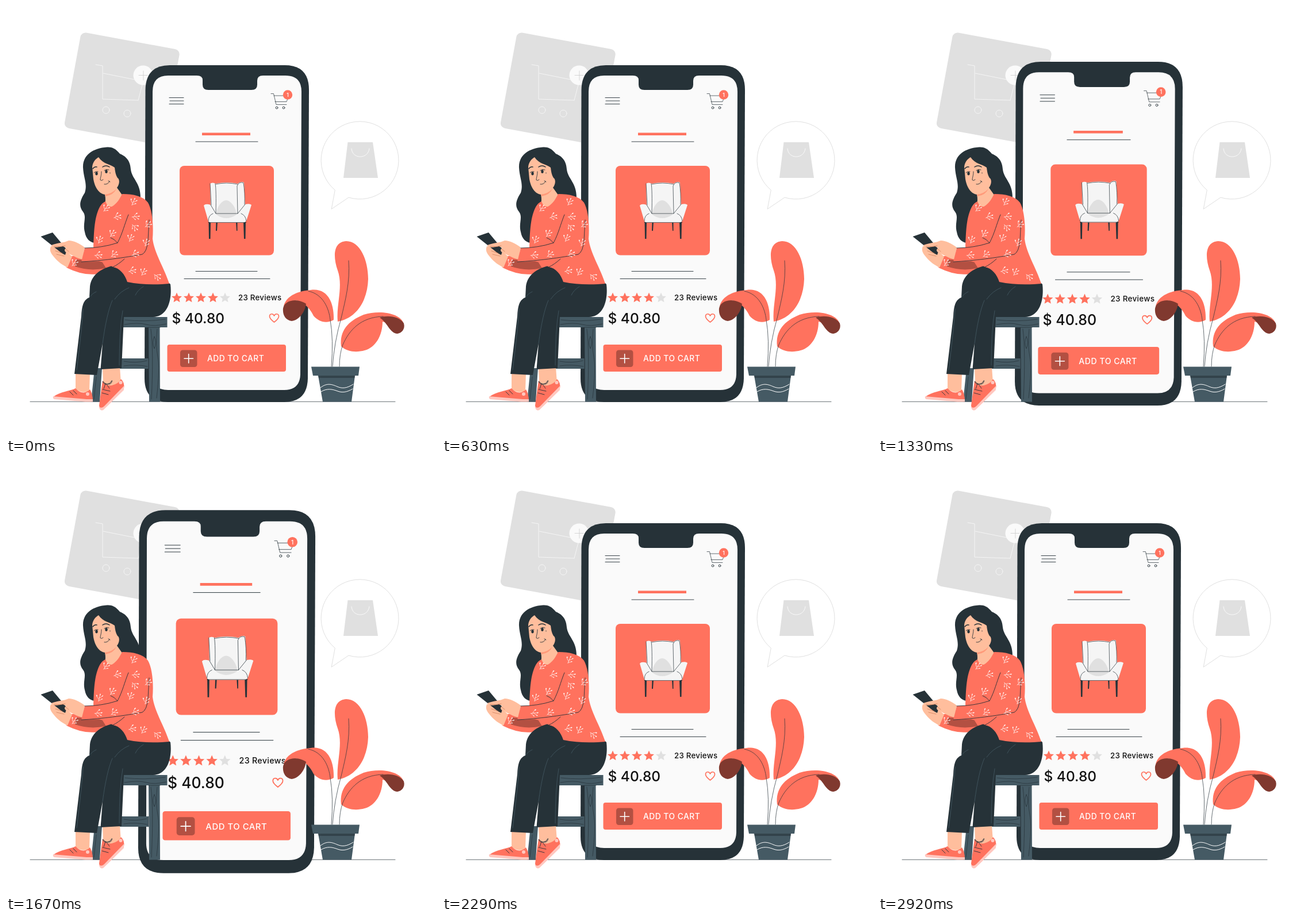
An HTML page that plays this animation: 748 by 748 pixels, repeating every 2960 ms.

```html
<!DOCTYPE html>
<html lang="en">
<head>
<meta charset="utf-8">
<title>Add to cart</title>
<style>
html, body { margin: 0; width: 100%; height: 100%; overflow: hidden; background: #fff; }
svg { display: block; width: 100%; height: 100%; fill: none; stroke-linecap: round; stroke-linejoin: round; }
text { font-family: Inter, "Open Sans", sans-serif; font-weight: 450; }
.dark { fill: #263238; }
.coral { fill: #ff725e; }
.rust { fill: #80392f; }
.shade { fill: #b35042; }
.grey { fill: #e0e0e0; }
.pale { fill: #fafafa; }
.slate { fill: #455a64; }
.skin { fill: #ffbe9d; }
.pink { fill: #ffc7bf; }
.ink { stroke: #263238; stroke-width: .9; }
.thin { stroke: #263238; stroke-width: .7; }
.bold { stroke: #263238; stroke-width: 1.5; }
.white { stroke: #fff; }
</style>
</head>
<body>
<svg viewBox="0 0 748 748">
  <defs>
    <g id="sprig" class="white" stroke-width=".8">
      <path d="M0 8Q0 0 1-7M0 3Q-4 1-6-3M0 0Q4-1 6-5M0 6Q4 5 6 2"/>
      <path fill="#fff" d="M1-7q-2-1 0-3q2 2 0 3M-6-3q-2 0-1-3q3 1 1 3M6-5q0-2 2-2q0 2-2 2M6 2q1-2 2-1q0 1-2 1"/>
    </g>
    <path id="star" d="M0-9 2.6-3 9-2.6 4.2 1.8 5.5 7.8 0 4.6-5.5 7.8-4.2 1.8-9-2.6-2.6-3Z"/>
  </defs>

  <!-- Cart card -->
  <rect class="grey" width="175" height="169" rx="9" transform="translate(131 45) rotate(10.4)"/>
  <g stroke="#f5f5f5">
    <path d="M156 102 168 104 168 162 230 164M169 117 224 128M237 137 230 164"/>
    <circle cx="174" cy="181" r="6"/><circle cx="211" cy="187" r="6"/>
  </g>
  <circle class="pale" cx="238.500" cy="120.500" r="17"/>
  <path stroke="#ccc" stroke-width=".8" d="M231 120.500h15M239 113v16"/>

  <!-- Speech bubble -->
  <path fill="#fff" stroke="#e0e0e0" d="M572 320A67.500 67.500 0 1 1 596 333L566.500 353Z"/>
  <path class="grey" d="M594.500 237H638L647 299H587Z"/>
  <path stroke="#fafafa" d="M601 248C602 267 630 267 632 248"/>

  <path class="thin" d="M42 688.300H677"/>

  <g id="phone">
    <path class="dark" d="M285 103H485Q527 103 527 146L525 648Q524 689 484 689H282Q241 689 241 648L242.500 146Q243 103 285 103Z"/>
    <path class="pale" d="M282 121H332Q342 121 342 129V137Q342 146 352 146H427Q437 146 437 137V130Q437 121 447 121H486Q514 121 514 149L512 641Q511 668 484 668H282Q254 668 254 641L255 149Q255 121 282 121Z"/>
    <path class="ink" d="M284 159.500H309M285 165H309M284 170.500H309"/>
    <path class="thin" d="M461 152.500H465.500L470 171.500H488M466 156H482M468 166.500H488L490 161"/>
    <circle class="ink" cx="471" cy="177" r="1.900"/><circle class="ink" cx="483" cy="177" r="1.900"/>
    <circle class="coral" cx="490" cy="154.500" r="8.200"/>
    <text x="490" y="158" font-size="9.500" text-anchor="middle" fill="#fff">1</text>

    <path class="coral" d="M341 220.500H425V225H341Z"/>
    <path class="ink" d="M330 236H438M330 461.500H437M310 474.500H459"/>
    <rect class="coral" x="302" y="278" width="164" height="155.500" rx="8"/>

    <!-- Armchair -->
    <path class="dark" d="M352.500 375H356L355.500 405H353ZM413 375H417L416.500 405H414ZM365.500 375H368L367 391H365ZM400 375H402.500V391H401Z"/>
    <path fill="#f5f5f5" d="M355 309Q359 306 365 309Q384 305 403 309Q409 304 414 307L416 345Q424 343 427 346L419 371Q418 376 413 377H357Q352 377 351 371L344 347Q347 343 356 346Z"/>
    <path class="grey" d="M366 363C366 349 376 338 383 338S400 349 401 363Q383 375 366 363Z"/>
    <path class="thin" d="M364 309Q366 320 365 361M403 361 402 313Q405 305 413 307.500Q416 325 415 345M355 309 357 346M365 310Q383 306 403 310M356 346 365 361H403L416 345M352 376.500H418M352 374Q352 364 360 361M418 374Q417 364 409 361"/>

    <g id="stars"></g>
    <text x="404" y="512" font-size="13.300" letter-spacing=".25" fill="#111">23 Reviews</text>
    <text x="288.500" y="552" font-size="24.500" fill="#111">$ 40.80</text>
    <path stroke="#ff725e" stroke-width="1.700" d="M466.500 550C460 545 458.500 542 458.500 540C458.500 534.500 465 534.500 466.500 539C468 534.500 474.500 534.500 474.500 540C474.500 542 473 545 466.500 550Z"/>
    <rect class="coral" x="280.500" y="589" width="206.500" height="47" rx="4"/>
    <rect class="shade" x="303" y="598.500" width="29.500" height="29.500" rx="4.500"/>
    <path class="white" stroke-width="1.600" d="M310 613.300H325.500M317.700 605.500V621"/>
    <text x="350" y="618.300" font-size="13.800" letter-spacing=".5" fill="#fff">ADD TO CART</text>
  </g>

  <!-- Stool -->
  <path class="slate" d="M200 541H280.500V559H200ZM248 559H267.500L268 688.500H249ZM195 613H248V631H195ZM154 630H167L163 688.500H148Z"/>
  <path class="thin" d="M207 546Q240 550 277 545M206 554Q230 550 244 554T279 553M252 562Q257 600 253 684M263 562Q260 590 264 610T262 682M258 575Q263 585 258 596Q253 585 258 575M205 618Q225 622 245 617M205 626Q225 623 246 627M248 559H268M248 613V631M157 645 153 684"/>

  <!-- Woman: hair, face -->
  <path class="dark" d="M176 245.500C152 247 133 259 134 281C135 300 142 309 137 325C130 336 125 347 134 358C141 367 133 378 137 393C139 405 146 411 154 412L172 400 192 350 234 333C234 307 219 301 217 284C216 267 207 261 198 257C191 248 184 245 176 245.500Z"/>
  <path class="skin" d="M150 280C151 271 156 266 161 263C169 275 181 275 189 281C190 289 191 294 194 299C198 301 198 310 193 316L203 330 184 354 172 346Q174 337 172 328C160 326 154 313 152 301Z"/>
  <path fill="#ff9a7a" d="M172 328Q185 326 192 318Q187 329 173 331Z"/>
  <ellipse class="dark" cx="157.500" cy="291.500" rx="2.200" ry="2.900"/>
  <ellipse class="dark" cx="174.500" cy="288" rx="2.200" ry="2.900"/>
  <path class="bold" d="M151 283Q154 279 158 280M168 280Q174 276 180 280"/>
  <path class="ink" d="M153 290Q156 287 160 288M171 286Q175 283 179 285M166 288C166 295 164 299 164 302.500Q166 305 169 302M171 310Q177 311 180 305M178 304 181 306M181 290V291"/>

  <!-- Far arm and hands -->
  <path class="coral" d="M114 435 105 455Q135 470 160 466Q175 462 185 452L150 435Z"/>
  <path class="shade" d="M122 441 120 453Q145 462 174 456L166 443Z"/>
  <path class="skin" d="M78 418C75 425 78 430 83 436C91 446 98 450 107 455L115 436Q106 426 94 420Z"/>
  <path class="dark" d="M60.500 401 81 394 106 424 103 433 97 430Z"/>
  <path class="skin" d="M137 420C128 413 118 408 109 408C101 412 88 412 79 416C79 420 86 421 99 418L105 421C99 424 103 429 108 430C116 434 124 439 133 441Z"/>
  <path stroke="#c97955" stroke-width=".7" d="M84 418Q94 420 103 417M86 426 98 430M88 432 101 435M103 422 109 427"/>

  <!-- Trousers -->
  <path class="skin" d="M121 638H146L145 670Q132 675 121 666ZM168 628H198L200 656 180 665 169 655Z"/>
  <path class="dark" d="M185 452C164 457 148 469 146 488L145 507C135 511 132 520 131 540L119 640 158 642 168 587 164.500 632 201 630 205 541H256C283 540 289 508 286 484L270 470Z"/>
  <path stroke="#455a64" stroke-width=".8" d="M145 507Q150 500 157 497M134 527Q132 560 123 633M168 587Q175 535 185 512M214 490Q199 496 189 510M239 488Q229 494 225 503M197 625Q197 565 203 530"/>

  <!-- Sweater -->
  <path class="coral" d="M164 348C168 342 171 341 173 340Q177 350 184 349C193 344 198 335 202 327C222 327 239 331 247 342C254 354 257 380 255 405C258 430 275 455 284 483C262 485 235 485 211 480C207 467 198 456 186 454C178 449 170 446 162 444L131 445 137 421 152 420C153 390 154 365 164 348Z"/>
  <path class="ink" d="M137 421Q166 421 194 412C203 395 206 380 213 363M131 445C168 443 205 438 237 432Q245 428 247 408L249 372M194 412Q188 405 182 403M186 454Q195 450 206 440"/>
  <g id="sprigs"></g>

  <!-- Shoes -->
  <path class="coral" d="M82 680C95 670 112 670 121 665C131 676 140 673 146 667Q151 675 151 687H140L83 682Z"/>
  <path class="pink" d="M82 679Q81 683 84 684L138 688.500H151V684H140Z"/>
  <circle class="pink" cx="142" cy="675" r="3"/>
  <path class="ink" d="M117 669 123 675M111 671 117 677"/>
  <path class="coral" d="M168 652Q174 662 184 660Q196 657 200 649Q207 655 205 666L185 687 168 703Q163 703 162 695C164 680 166 665 168 652Z"/>
  <path class="pink" d="M205 661V668L169 703Q163 705 162 697Q166 701 171 696Z"/>
  <circle class="pink" cx="199.500" cy="655" r="3"/>
  <path class="ink" d="M173 657Q166 650 169 655T181 656Q186 648 184 654T173 657L170 666M174 657 180 665M168 667 181 670M167 673 178 676"/>

  <!-- Plant -->
  <path class="coral" d="M577 549C574 520 587 488 577 460C568 434 570 410 592 409C616 409 630 442 630 475C629 511 611 543 577 549Z"/>
  <path class="coral" d="M483 522C487 505 506 496 530 494C560 490 571 517 570 546C556 554 543 548 535 539C528 525 518 515 504 512Z"/>
  <path class="rust" d="M482 526C484 512 506 507 522 518C520 533 510 546 497 548C486 546 481 538 482 526Z"/>
  <path class="coral" d="M583 592C580 565 595 548 622 537C650 528 687 534 692 553Q680 557 655 549C655 573 643 594 624 599C610 603 594 602 583 592Z"/>
  <path class="rust" d="M650 542C666 537 685 541 692 552C695 562 688 569 681 570C667 569 665 552 650 542Z"/>
  <path class="thin" d="M596 443C599 480 590 513 583 543Q571 585 568 627M526 496C552 501 562 527 564 546Q570 580 566 627M656 540C617 541 597 564 586 589Q580 605 580 627"/>
  <path class="slate" d="M531 627.500H615L613 643H607L601 688.500H551L543 643H534Z"/>
  <path class="dark" opacity=".55" d="M543 643H607L606.500 647H544Z"/>
  <path class="white" d="M547 664C558 655 567 658 576 662S593 665 604 658M548 671C559 664 569 667 577 670S593 672 603 666"/>
</svg>
<script>
const byId = id => document.getElementById(id);

byId('stars').innerHTML = [0, 1, 2, 3, 4].map(i =>
  `<use href="#star" class="${i < 4 ? 'coral' : 'grey'}" x="${297 + 21 * i}" y="507.500"/>`).join('');

// x, y, angle
byId('sprigs').innerHTML = [
  [173, 352, 30], [193, 366, 65], [221, 341, 20], [225, 366, 80], [246, 380, 40],
  [184, 396, 25], [162, 407, 10], [216, 404, 15], [224, 384, 130], [187, 432, 45],
  [160, 433, 80], [224, 431, 60], [243, 412, 10], [238, 463, 20], [219, 460, 70],
  [263, 470, 120], [118, 447, 30]
].map(([x, y, a]) => `<use href="#sprig" transform="translate(${x} ${y}) rotate(${a}) scale(.75)"/>`).join('');

const phone = byId('phone');
const LOOP = 2960, BEAT = 1500, FPS = 24;

// Distance from a beat's peak, scaled to 0..1
const away = (t, peak, half) => Math.min(1, Math.abs(t - peak) / half);

function draw() {
  // The picture steps at 24 frames a second
  const frame = Math.floor((performance.now() % LOOP + 4) * FPS / 1000);
  const t = frame * 1000 / FPS % BEAT;
  const soft = Math.cos(Math.PI / 2 * away(t, 271, 240));
  const sharp = 1 - away(t, 1125, 262);
  const scale = 1 + .1 * (soft + sharp);
  phone.setAttribute('transform', `translate(384 396) scale(${scale}) translate(-384 -396)`);
  requestAnimationFrame(draw);
}
draw();
</script>
</body>
</html>
```
